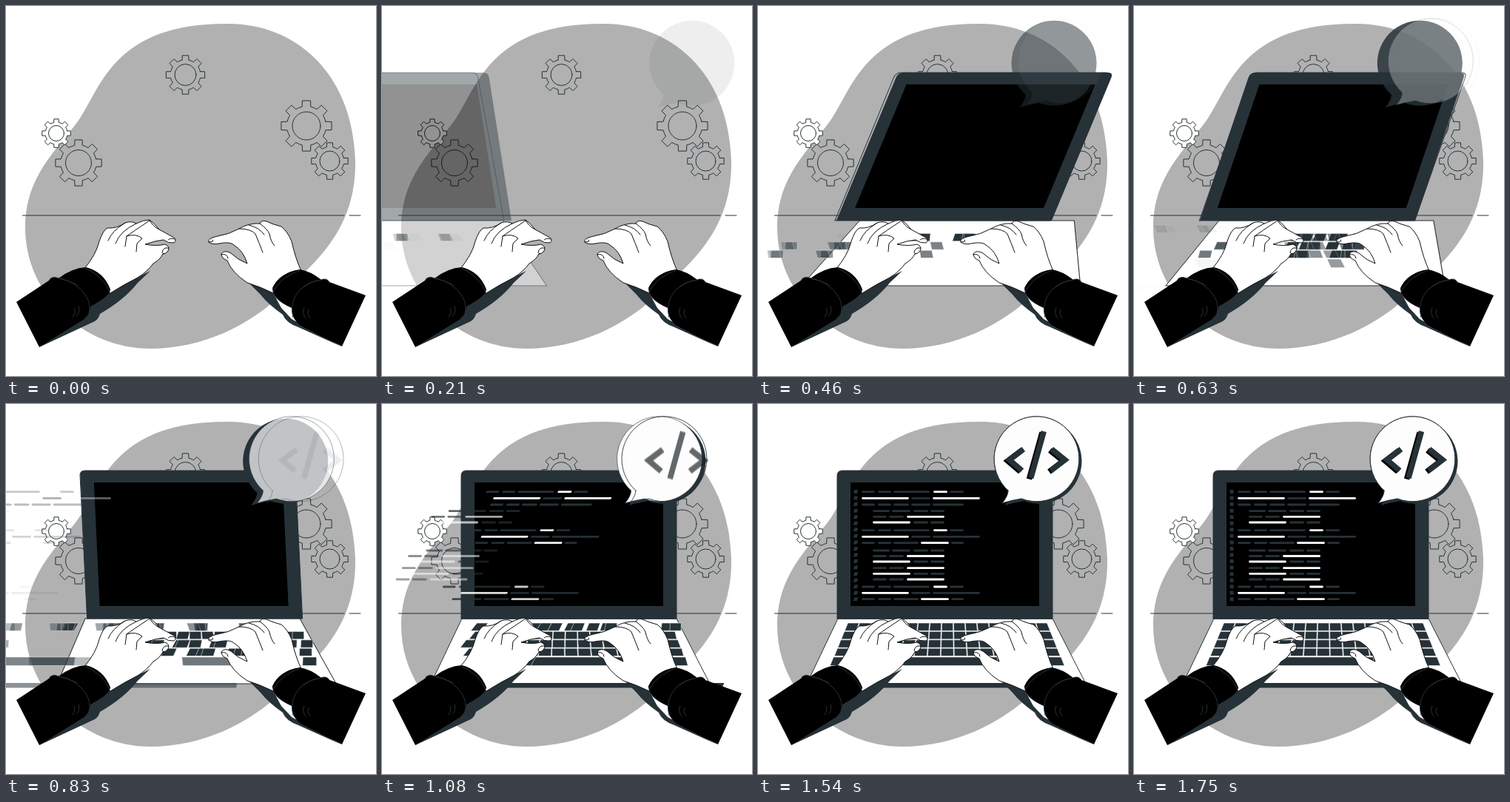
An HTML page that plays this animation: 500 px wide and 500 px high, repeating every 2 s.

```html
<!DOCTYPE html>
<html lang="en">
<head>
<meta charset="utf-8">
<title>Typing</title>
<style>
html, body { margin: 0; width: 100%; height: 100%; overflow: hidden; background: #fff; }
svg { display: block; width: 100vw; height: 100vh; }
.line { fill: none; stroke: #263238; stroke-width: 1; stroke-linecap: round; stroke-linejoin: round; }
.skin { fill: #fff; stroke: #111; stroke-width: 1; stroke-linejoin: round; }
.crease { fill: none; stroke: #111; stroke-width: 1; stroke-linecap: round; }
.dark { fill: #263238; }
</style>
</head>
<body>
<svg viewBox="0 0 500 500">
  <path fill="#b1b1b1" d="M297 24C385 22 468 85 472 208C474 300 420 345 375 387C330 432 265 463 195 463C105 463 26 390 26 300C26 225 75 190 101 150C130 105 150 24 297 24Z"/>
  <g id="gears"></g>
  <path class="line" d="M22.500 283H457M464 283H479"/>
  <g id="laptop"></g>
  <g id="code"></g>
  <g id="bubble"></g>
  <g id="hands">
    <path class="dark" d="M45 461L120 426Q125 423 127 416Q160 397 178 374L195 358L141 385L100 410Z"/>
    <path class="skin" d="M105 356Q122 336 126 318Q131 303 137 300Q150 301 161 293Q170 290 176 294Q186 289 194 289Q201 294 207 302L227 313Q231 317 227 320Q219 321 213 316Q202 317 188 322Q203 325 215 322Q222 325 219 331Q216 335 212 335Q208 343 199 348Q191 359 178 367Q158 377 141 388L115 380Z"/>
    <path class="crease" d="M161 293Q143 304 138 317M176 294Q154 304 148 321M194 290Q170 306 163 311L161 325M163 311Q176 307 184 314L177 321L176 332M207 302Q200 299 194 290M213 335Q208 333 215 327L220 327M219 316Q222 313 228 315"/>
    <path d="M14 400L58 371Q61 364 71 368Q89 354 108 353Q132 359 141 383Q141 392 114 406Q113 420 101 426L45 461Z"/>
    <path class="line" d="M58 371Q63 364 71 368Q96 372 109 393Q115 404 112 417M71 368Q84 370 96 377M98 406Q101 413 95 419M92 408Q95 414 90 420M107 354Q131 365 140 386"/>
    <path class="dark" d="M328 374L360 386L372 408L386 423L453 460L395 434Q378 428 374 417Q354 403 344 390Z"/>
    <path class="skin" d="M399 358Q391 341 386 318Q380 304 372 298Q360 295 352 291Q345 289 343 294Q328 293 315 301Q300 309 286 311Q272 314 274 319Q279 323 288 321Q303 318 308 323Q321 331 326 348Q313 343 304 334Q295 329 291 335Q291 341 299 344Q305 360 326 374Q343 379 361 388L380 376Z"/>
    <path class="crease" d="M315 301Q331 301 337 308Q342 320 347 333M343 294Q353 301 356 308Q358 319 363 324M328 296Q342 299 349 309M274 319Q282 319 279 316M291 336Q299 334 300 341"/>
    <path d="M486 391L454 460L398 432Q386 423 386 408Q360 397 360 381Q370 360 397 356Q411 358 426 370Q434 367 437 373Z"/>
    <path class="line" d="M437 373Q433 367 426 370Q402 373 391 392Q384 405 388 421M426 370Q412 372 402 380M403 408Q399 414 405 422M409 410Q406 415 411 422M398 357Q371 366 361 386"/>
  </g>
</svg>
<script>
const LOOP = 2000, STEP = 1000 / 24, LAST = 42;
const INK = '#263238';
const byId = id => document.getElementById(id);
const parts = [];

function add(parent, tag, attrs) {
  const node = document.createElementNS('http://www.w3.org/2000/svg', tag);
  for (const name in attrs) node.setAttribute(name, attrs[name]);
  return parent.appendChild(node);
}

// Registers a part that enters from one side; pivot is the y its skew turns about.
function enter(node, start, dist, pivot, skewed = true) {
  parts.push({ node, start, dist, pivot, skewed });
  return node;
}

function ease(x) {
  if (x <= 0) return 0;
  if (x >= 1) return 1;
  const curve = (s, a, b) => 3 * (1 - s) ** 2 * s * a + 3 * (1 - s) * s * s * b + s ** 3;
  let lo = 0, hi = 1;
  for (let i = 0; i < 24; i++) {
    const mid = (lo + hi) / 2;
    if (curve(mid, .36, .5) < x) lo = mid; else hi = mid;
  }
  return curve(lo, -.01, 1.38);
}

function skewAt(u) {
  if (u < 600) return 30 - 50 * ease(u / 600);
  if (u < 800) return -20 + 23 * ease((u - 600) / 200);
  return 3 * (1 - ease((u - 800) / 200));
}

function gear(x, y, r, hole, fill = 'none') {
  const at = (radius, a) => `${(x + radius * Math.cos(a)).toFixed(2)} ${(y + radius * Math.sin(a)).toFixed(2)}`;
  const root = r * .77;
  let d = '';
  for (let i = 0; i < 8; i++) {
    const a = i * Math.PI / 4;
    d += (i ? `A${root} ${root} 0 0 1 ` : 'M') + at(root, a - .22) +
      `L${at(r, a - .16)}L${at(r, a + .16)}L${at(root, a + .22)}`;
  }
  d += `A${root} ${root} 0 0 1 ${at(root, -.22)}Z`;
  add(byId('gears'), 'path', { d, class: 'line', style: `fill:${fill}` });
  add(byId('gears'), 'circle', { cx: x, cy: y, r: hole, class: 'line' });
}

function buildLaptop() {
  const box = byId('laptop');
  const lid = 'M107 290V97Q107 90 114 90H391Q398 90 398 97V290Z';
  enter(add(box, 'path', { d: 'M108 290H398L443 378H66Z', fill: '#fff', stroke: INK }), 0, 400, 310);
  enter(add(box, 'path', { d: 'M66 377H443V381Q443 383.500 440 383.500H69Q66 383.500 66 381Z', fill: INK }), 595, 280, 380);
  const shell = enter(add(box, 'g', {}), 0, 400, 237);
  add(shell, 'path', { d: lid, fill: INK });
  add(shell, 'path', { d: 'M125 106H380V273H125Z', fill: '#000' });
  enter(add(box, 'path', { d: lid, class: 'line' }), 8, 400, 237);

  const left = y => 121 - (y - 296) * .41, right = y => 391 + (y - 296) * .4;
  const quad = (y, h, a, b, gap) => {
    const x = (yy, k) => left(yy) + (right(yy) - left(yy)) * k;
    return `M${x(y, a) + gap} ${y}L${x(y, b) - gap} ${y}L${x(y + h, b) - gap} ${y + h}L${x(y + h, a) + gap} ${y + h}Z`;
  };
  const key = (d, start, y) =>
    enter(add(box, 'path', { d, fill: INK, stroke: '#fff', 'stroke-width': .5 }), start, 250, y);
  const rowStart = [500, 20, 170, 200], cols = 17;
  for (let row = 0; row < 4; row++) {
    for (let col = 0; col < cols; col++) {
      const y = 296 + row * 11.4;
      const jitter = (col * 7 + row * 5) % 11 / 11;
      let start = rowStart[row] + jitter * 170;
      if (row && col < 3) start = 630 + jitter * 50;
      if (row && col > 13) start = 370 + jitter * 60;
      key(quad(y, 10.4, col / cols, (col + 1) / cols, .5), start, y + 5);
    }
  }
  [[0, .31, 580], [.31, .72, 650], [.72, .94, 560], [.94, 1, 400]].forEach(([a, b, start]) =>
    key(quad(342, 11.5, a, b, 0), start, 348));
}

function buildCode() {
  const box = byId('code');
  // Each span is start-end; a star marks a bright one.
  const kinds = {
    a: '140-158 162-180 183-232 *237-256 259-278',
    b: '*140-204 207-233 236-300*',
    c: '140-158 162-180 183-204 207-233 236-278',
    d: '140-158 162-180 183-217 *220-258 261-278',
    e: '155-178 181-206 210-230 233-252',
    f: '155-174 177-197 *201-252',
    g: '*155-206 210-230 233-252'
  };
  kinds.h = kinds.b.replace('300*', '300');
  const rows = [
    [118.7, 'a', 674], [127.3, 'b', 640], [136, 'c', 657],
    [144.7, 'e', 785], [152.3, 'f', 813], [160, 'g', 798],
    [170.7, 'a', 725], [179.3, 'h', 691], [187.7, 'd', 708],
    [198, 'e', 821], [205.5, 'f', 848], [213, 'g', 834],
    [221.7, 'f', 857], [229.3, 'g', 843], [237, 'f', 866],
    [247, 'a', 776], [255.3, 'h', 742], [263.7, 'd', 759]
  ];
  rows.forEach(([y, kind, start], i) => {
    const row = enter(add(box, 'g', {}), start, 250, y);
    for (const span of kinds[kind].split(' ')) {
      const [x1, x2] = span.replace(/\*/g, '').split('-').map(Number);
      add(row, 'path', {
        d: `M${x1 + 1.5} ${y}H${x2 - 1.5}`, stroke: span.includes('*') ? '#fff' : INK,
        'stroke-width': 2.8, 'stroke-linecap': 'round'
      });
    }
    const mark = 118.5 + i * 8.55;
    enter(add(box, 'rect', { x: 129.5, y: mark - 2.5, width: 5, height: 5, fill: INK }), 865 + i * 4, 250, mark);
  });
}

function buildBubble() {
  const box = byId('bubble');
  const d = 'M338 117Q338 124 330 134Q343 130 356 128A57.500 57.500 0 1 0 338 117Z';
  const slide = (attrs, start, dist) => {
    const holder = add(box, 'g', {});
    add(holder, 'path', attrs);
    enter(holder, start, -dist, 0, false);
  };
  slide({ d, fill: INK, transform: 'translate(3.500 3)' }, 65, 42);
  slide({ d, fill: '#fdfdfd', stroke: INK, 'stroke-width': .6 }, 345, 34);
  slide({ d, class: 'line' }, 520, 34);
  const glyph = 'M360 61L341 75.500L358 90M387.500 37L370 100M398 61L416 75.500L397 90';
  const bold = { d: glyph, fill: 'none', 'stroke-width': 7.5 };
  slide({ ...bold, stroke: '#000', transform: 'translate(-1.500 1.500)' }, 750, 34);
  slide({ ...bold, stroke: INK, transform: 'translate(1 0)' }, 715, 34);
}

function render(t) {
  for (const { node, start, dist, pivot, skewed } of parts) {
    const u = t - start;
    const p = ease(u / (skewed ? 600 : 1000));
    const k = skewed ? Math.tan(skewAt(Math.max(0, u)) * Math.PI / 180) : 0;
    const shift = -dist * (1 - p) - k * pivot;
    node.setAttribute('transform', `matrix(1 0 ${k.toFixed(5)} 1 ${shift.toFixed(3)} 0)`);
    node.setAttribute('opacity', Math.max(0, Math.min(1, p)).toFixed(3));
  }
}

gear(242.5, 93, 26.5, 14.5);
gear(406, 162, 34.5, 19);
gear(437.5, 209.5, 25, 13.5);
gear(98, 212, 31.5, 17.5);
gear(68, 172, 19.5, 10.5, '#fff');
buildLaptop();
buildCode();
buildBubble();

const begin = performance.now();
function tick() {
  const ms = (performance.now() - begin) % LOOP;
  render(Math.min(LAST, Math.floor((ms + 5) / STEP)) * STEP);
  requestAnimationFrame(tick);
}
tick();
</script>
</body>
</html>
```
